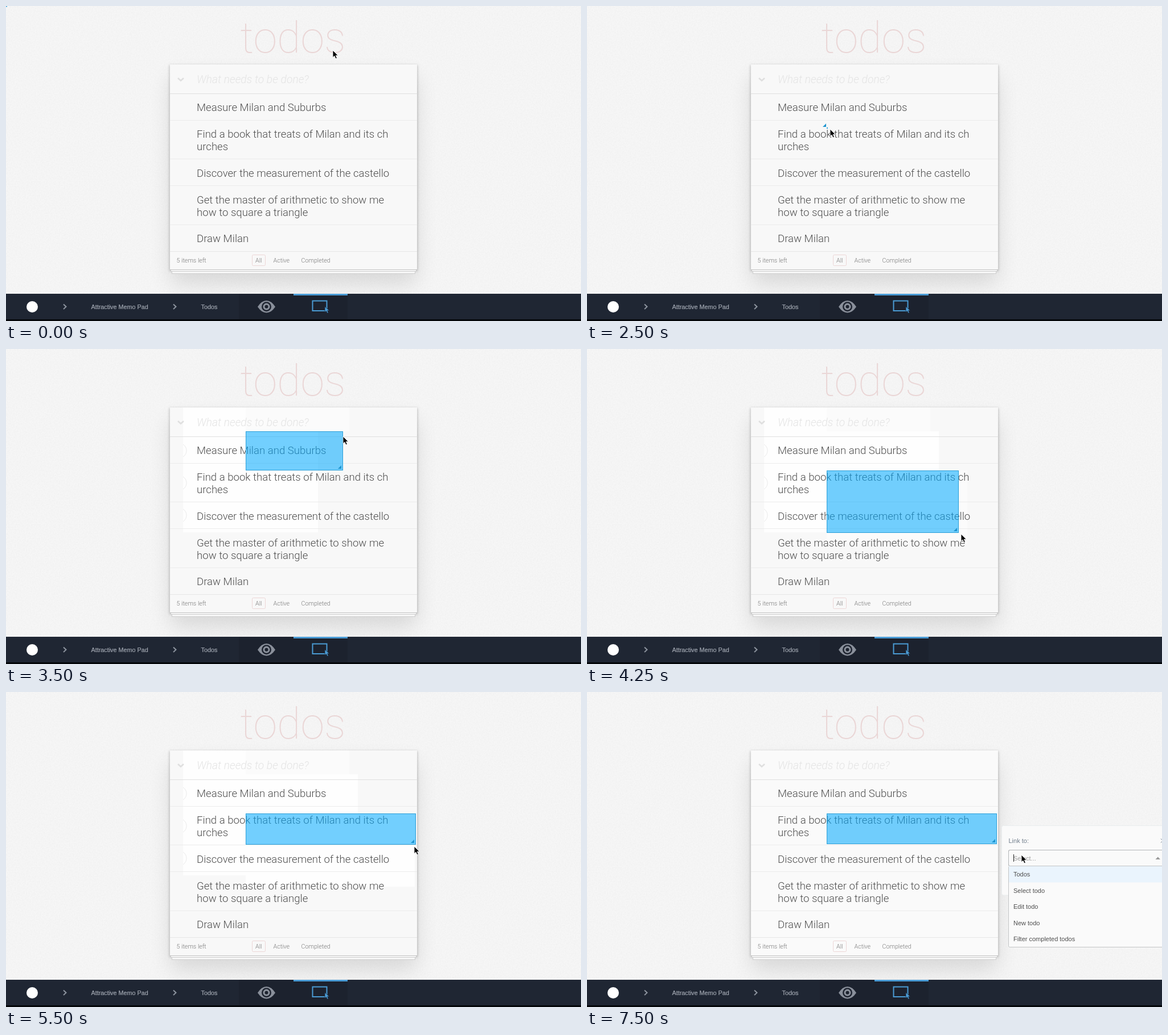
Write an HTML page that moves like this. It is 1010 by 555 pixels and loops after 8 s.

```html
<!DOCTYPE html>
<html lang="en">
<head>
<meta charset="utf-8">
<title>Todo list hotspot</title>
<style>
  html, body { margin: 0; width: 100%; height: 100%; overflow: hidden; background: #f5f5f5; }
  svg { display: block; width: 1010px; height: 555px; }
  text { white-space: pre; }
  .light { font-family: Roboto, "Liberation Sans", sans-serif; font-weight: 300; }
  .ui { font: 11px "Liberation Sans", Arial, sans-serif; }
  .item { font-size: 18.6px; fill: #4d4d4d; }
  .foot { font-size: 10.7px; fill: #777; }
  .crumb { font-size: 10.8px; fill: #a3a9b3; stroke: #a3a9b3; stroke-width: .2px; }
  .muted { fill: #717e8c; }
</style>
</head>
<body>
<svg viewBox="0 0 1010 555">
  <defs>
    <filter id="grain" x="0" y="0" width="100%" height="100%">
      <feTurbulence type="fractalNoise" baseFrequency=".45" numOctaves="2" seed="4"/>
      <feColorMatrix values="0 0 0 0 .5  0 0 0 0 .5  0 0 0 0 .5  .16 0 0 0 -.05"/>
    </filter>
    <filter id="blur" x="-30%" y="-30%" width="160%" height="160%"><feGaussianBlur stdDeviation="19"/></filter>
    <filter id="soft"><feGaussianBlur stdDeviation="2"/></filter>
    <clipPath id="freshArea"><rect id="freshClip" x="288" y="103" width="434" height="362"/></clipPath>
  </defs>

  <rect width="1010" height="555" fill="#f6f6f6"/>
  <rect width="1010" height="507" filter="url(#grain)"/>
  <text class="light" x="504" y="82" text-anchor="middle" font-size="75.6" style="font-weight:100" fill="#ead6d6">todos</text>

  <!-- card -->
  <rect x="290" y="126" width="430" height="362" opacity=".12" filter="url(#blur)"/>
  <rect x="287" y="104" width="436" height="363" opacity=".2" filter="url(#soft)"/>
  <g stroke="#cfcfcf" fill="#f6f6f6">
    <rect x="291.5" y="460.5" width="427" height="11"/>
    <rect x="289.5" y="460.5" width="431" height="7"/>
  </g>
  <rect id="card" x="288" y="103" width="434" height="361"/>
  <path d="M288 464.5H722" stroke="#c4c4c4"/>
  <g id="fresh" clip-path="url(#freshArea)"></g>
  <g id="lines"></g>
  <path d="M302 127l5 4.5 5-4.5" fill="none" stroke="#dfdfdf" stroke-width="2.6"/>
  <text class="light" x="335" y="135.5" font-size="19.3" font-style="italic" fill="#e4e4e4">What needs to be done?</text>
  <g id="items"></g>
  <g class="light foot">
    <text x="299.5" y="452.3">5 items left</text>
    <rect x="432.5" y="438.5" width="23" height="19" rx="2" fill="none" stroke="#ecd6d6"/>
    <text x="438" y="452.3">All</text>
    <text x="469.5" y="452.3">Active</text>
    <text x="518.5" y="452.3">Completed</text>
  </g>

  <!-- toolbar -->
  <rect y="507" width="1010" height="48" fill="#1f2633"/>
  <rect x="409" y="507" width="191" height="46" fill="#1c222e"/>
  <rect y="552" width="1010" height="3" fill="#05070b"/>
  <rect x="505" y="507" width="95" height="3" fill="#4a9bd4"/>
  <circle cx="46" cy="530" r="10" fill="#fff"/>
  <path d="M101 525.5l4.5 4.3-4.5 4.3M294 525.5l4.5 4.3-4.5 4.3" fill="none" stroke="#8d949f" stroke-width="2"/>
  <text class="ui crumb" x="149.5" y="533.7">Attractive Memo Pad</text>
  <text class="ui crumb" x="342.5" y="533.7">Todos</text>
  <path d="M442 530Q449 519 457.500 519T473 530Q466 540.500 457.500 540.500T442 530Z" fill="#8a909b"/>
  <circle cx="457.500" cy="529.700" r="7.300" fill="#8a909b" stroke="#1c222e" stroke-width="2.400"/>
  <circle cx="457.500" cy="529.700" r="3" fill="#1c222e"/>
  <rect x="538.500" y="519.500" width="25" height="17.500" fill="none" stroke="#4a9bd4" stroke-width="2"/>
  <path d="M560 529.500v10l2.500-2 1.800 3.700 2-1-1.800-3.500h3.500z" fill="#4a9bd4" stroke="#1c222e" stroke-width=".7"/>

  <!-- hotspot -->
  <rect id="origin" width="2" height="1.500" fill="#3ba4dc"/>
  <g id="spot">
    <rect id="area" fill="#0af" fill-opacity=".55" stroke="#2b9fd8"/>
    <path id="grip" d="M-3-9v6h-6z" fill="#1d94cf"/>
  </g>

  <!-- link panel -->
  <g id="panel" class="ui">
    <rect x="728.500" y="235.500" width="300" height="122.500" rx="3" fill="#fafafa" stroke="#e9edee"/>
    <text class="muted" x="740.500" y="266">Link to:</text>
    <path d="M1008 258.500l7 7m0-7l-7 7" stroke="#717e8c"/>
    <rect x="740.500" y="278.500" width="290" height="28" rx="3" fill="#fafafa" stroke="#c6c9cb"/>
    <text x="749" y="296.500" fill="#a0a0a0">Select...</text>
    <path id="arrow" fill="#999"/>
    <rect x="740.500" y="315" width="72.500" height="31.500" rx="3" fill="#5fd07c"/>
    <text x="776.500" y="334.300" text-anchor="middle" font-weight="bold" font-size="10.800" fill="#fff">Save</text>
    <text class="muted" x="825" y="334.300" text-decoration="underline">Cancel</text>
  </g>
  <g id="menu" class="ui" fill="#4f4f4f">
    <rect x="740.500" y="306.500" width="290" height="143" rx="2" fill="#fafafa" stroke="#c3c5c6"/>
    <rect x="741" y="307" width="290" height="28.500" fill="#eaf4fd"/>
    <path d="M740.500 306V280q0-1.500 2-1.500H1012" fill="none" stroke="#b4b6b8"/>
    <path d="M749.500 286v13" stroke="#222"/>
  </g>

  <path id="pointer" d="M0 0V12.700L2.900 10 5 14.800 7.400 13.800 5.300 9.200H9.300Z" fill="#000" stroke="#fff" stroke-width=".9"/>
</svg>

<script>
const LOOP = 8000, TICK = 250;
const ANCHOR = { x: 421, y: 214 };
const $ = id => document.getElementById(id);

function set(el, attrs) {
  for (const name in attrs) el.setAttribute(name, attrs[name]);
  return el;
}
function add(parent, tag, attrs, text = '') {
  const el = document.createElementNS('http://www.w3.org/2000/svg', tag);
  el.textContent = text;
  return parent.appendChild(set(el, attrs));
}
const show = (el, on) => { el.style.display = on ? '' : 'none'; };

// time, x, y
const pointerKeys = [
  [0, 574, 78], [250, 398, 195], [1000, 398, 195], [2250, 424, 215], [2500, 427, 217],
  [2750, 537, 308], [3000, 314, 108], [3250, 520, 112], [3500, 592, 154],
  [3750, 607, 252], [4000, 642, 312], [4250, 657, 326], [4500, 692, 328], [4750, 710, 296],
  [5000, 715, 287], [5250, 720, 277], [5500, 717, 272], [5750, 716, 271], [6750, 716, 271],
  [7000, 736, 281], [7250, 760, 288], [7500, 763, 287]
];
const cornerKeys = [
  [2500, 423, 216], [2750, 533, 306], [3000, 311, 103], [3250, 518, 104], [3500, 592, 145],
  [3750, 603, 249], [4000, 638, 310], [4250, 653, 324], [4500, 690, 326], [4750, 712, 294],
  [5000, 718, 285], [5250, 722, 274], [5500, 720, 269], [5750, 720, 268]
];

function at(keys, t) {
  const next = keys.findIndex(k => k[0] > t);
  if (next < 0) return keys[keys.length - 1].slice(1);
  const a = keys[Math.max(0, next - 1)], b = keys[next];
  const p = Math.max(0, (t - a[0]) / (b[0] - a[0]));
  return [a[1] + (b[1] - a[1]) * p, a[2] + (b[2] - a[2]) * p];
}

[['Measure Milan and Suburbs', 185], ['Find a book that treats of Milan and its ch', 232],
 ['urches', 254], ['Discover the measurement of the castello', 300.7],
 ['Get the master of arithmetic to show me', 347.5], ['how to square a triangle', 369.5],
 ['Draw Milan', 416]].forEach(([text, y]) =>
  add($('items'), 'text', { class: 'light item', x: 335, y }, text));

[[154.5, '#e0e0e0'], [201.5, '#ececec'], [269.5, '#ececec'], [316.5, '#ececec'],
 [385.5, '#ececec'], [432.5, '#e6e6e6']].forEach(([y, stroke]) =>
  add($('lines'), 'path', { d: `M288 ${y}H722`, stroke }));

['Todos', 'Select todo', 'Edit todo', 'New todo', 'Filter completed todos'].forEach((text, i) =>
  add($('menu'), 'text', { x: 749, y: 325 + i * 28.5 }, text));

// brighter areas of the card left where the drag has passed: start, x, y, width, height, fill
const freshAreas = [
  [3000, 311, 103, 237, 220, '#fefefe'],
  [3500, 421, 103, 182, 42, '#fbfbfb'],
  [3750, 421, 145, 197, 69, '#fefefe'],
  [4250, 421, 214, 247, 129, '#fbfbfb'],
  [4500, 421, 214, 297, 129, '#fefefe']
].map(([start, x, y, width, height, fill]) =>
  ({ start, el: add($('fresh'), 'rect', { x, y, width, height, fill }) }));
const rings = add($('fresh'), 'path', {
  d: [179, 236, 293].map(y => `M311 ${y - 11}a13 13 0 0 1 0 22`).join(''),
  fill: 'none', stroke: '#eaeaea'
});

function draw(time) {
  const t = Math.floor(time / TICK) * TICK;
  const [px, py] = at(pointerKeys, t);
  set($('pointer'), { transform: `translate(${px} ${py})` });

  const dragging = t >= 2500, linked = t >= 6250, open = t >= 7500;
  show($('origin'), !dragging);
  show($('spot'), dragging);
  const [cx, cy] = at(cornerKeys, t).map(Math.round);
  const left = Math.min(cx, ANCHOR.x), top = Math.min(cy, ANCHOR.y);
  const width = Math.abs(cx - ANCHOR.x), height = Math.abs(cy - ANCHOR.y);
  set($('area'), {
    x: left + .5, y: top + .5, width: Math.max(1, width - 1), height: Math.max(1, height - 1)
  });
  set($('grip'), { transform: `translate(${left + width} ${top + height})` });

  set($('card'), { fill: linked ? '#fafafa' : '#f8f8f8' });
  set($('freshClip'), { height: linked ? 131 : 362 });
  show($('fresh'), t < 7000);
  freshAreas.forEach(({ start, el }) => show(el, t >= start));
  show(rings, t >= 3000);

  show($('panel'), linked);
  show($('menu'), open);
  set($('arrow'), { d: open ? 'M998.500 295h8.500l-4.250-4.500z' : 'M998.500 291h8.500l-4.250 4.500z' });
}

const begun = performance.now();
function tick() {
  draw((performance.now() - begun) % LOOP);
  requestAnimationFrame(tick);
}
tick();
</script>
</body>
</html>
```
